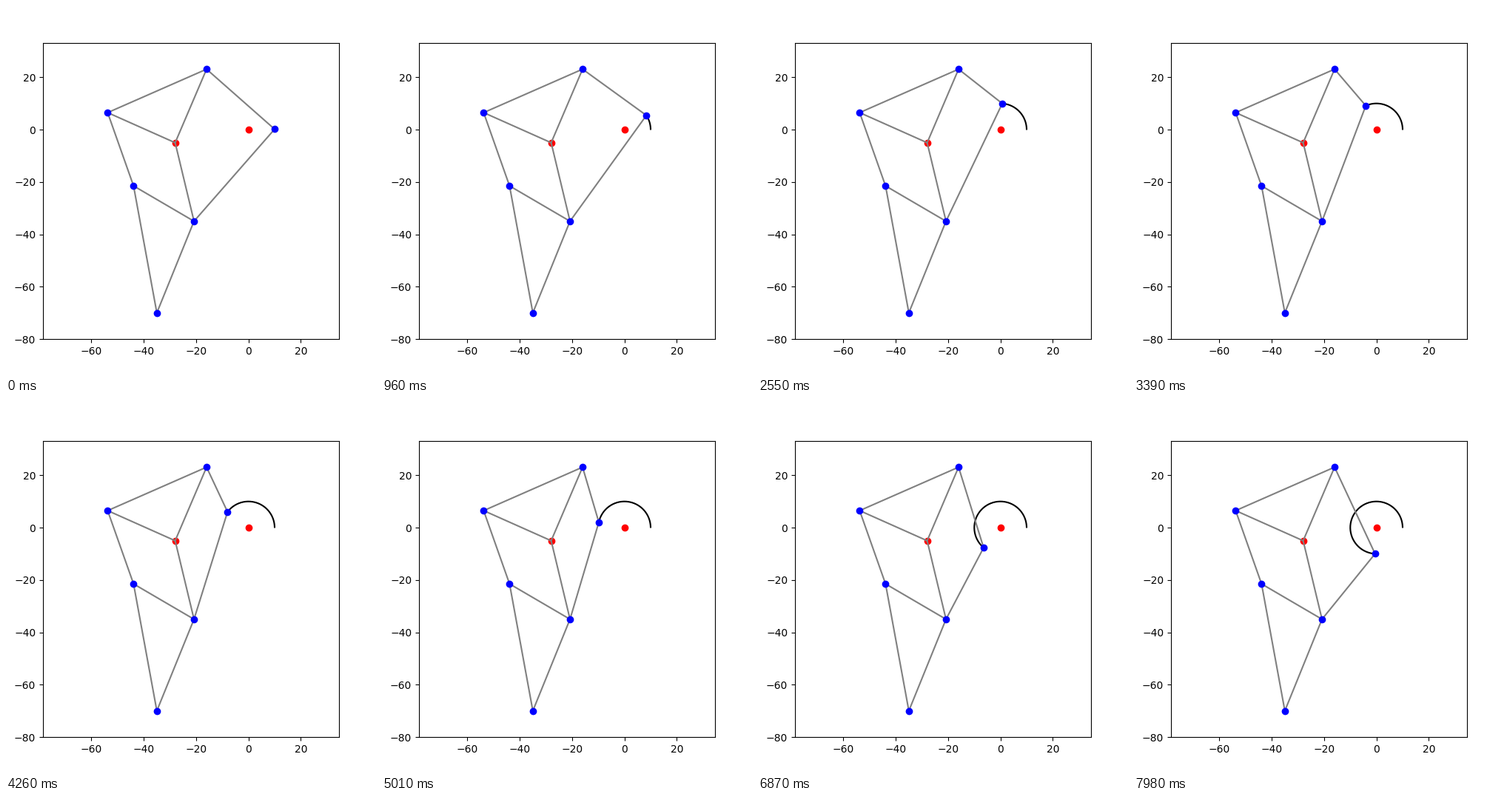
Write a matplotlib script that moves like this. It is 500 by 500 pixels and loops after 8 s.

```python
import numpy as np
import matplotlib.pyplot as plt
from matplotlib.animation import FuncAnimation

FRAMES, INTERVAL = 267, 30
RADIUS = 10

# Fixed joints of the leg linkage
joints = {
    "pivot": (-28, -5),
    "top": (-16, 23.1),
    "left": (-53.8, 6.5),
    "knee": (-43.9, -21.5),
    "hub": (-20.8, -35),
    "foot": (-35, -70),
}
links = [
    ("top", "left"), ("top", "pivot"), ("left", "pivot"), ("left", "knee"),
    ("pivot", "hub"), ("knee", "hub"), ("knee", "foot"), ("hub", "foot"),
]


def crank_pos(deg):
    a = np.radians(deg)
    return RADIUS * np.cos(a), RADIUS * np.sin(a)


fig = plt.figure(figsize=(5, 5), dpi=100)
ax = fig.add_axes([0.1, 0.1, 0.8, 0.8])
ax.set_xlim(-78.5, 34.6)
ax.set_ylim(-80, 33.1)

ax.plot([0, joints["pivot"][0]], [0, joints["pivot"][1]], "o", color="red")
trail, = ax.plot([], [], color="black")
for a, b in links:
    ax.plot(*zip(joints[a], joints[b]), color="gray")
rods = [ax.plot([], [], color="gray")[0] for _ in range(2)]
for name, pos in joints.items():
    if name != "pivot":
        ax.plot(*pos, "o", color="blue")
crank, = ax.plot([], [], "o", color="blue")


def update(i):
    deg = i + 1
    x, y = crank_pos(deg)
    crank.set_data([x], [y])
    for rod, end in zip(rods, ("top", "hub")):
        ex, ey = joints[end]
        rod.set_data([x, ex], [y, ey])
    trail.set_data(*crank_pos(np.arange(1, deg + 1)))
    return [trail, *rods, crank]


anim = FuncAnimation(fig, update, frames=FRAMES, interval=INTERVAL,
                     repeat=True, repeat_delay=0)
plt.show()
```
